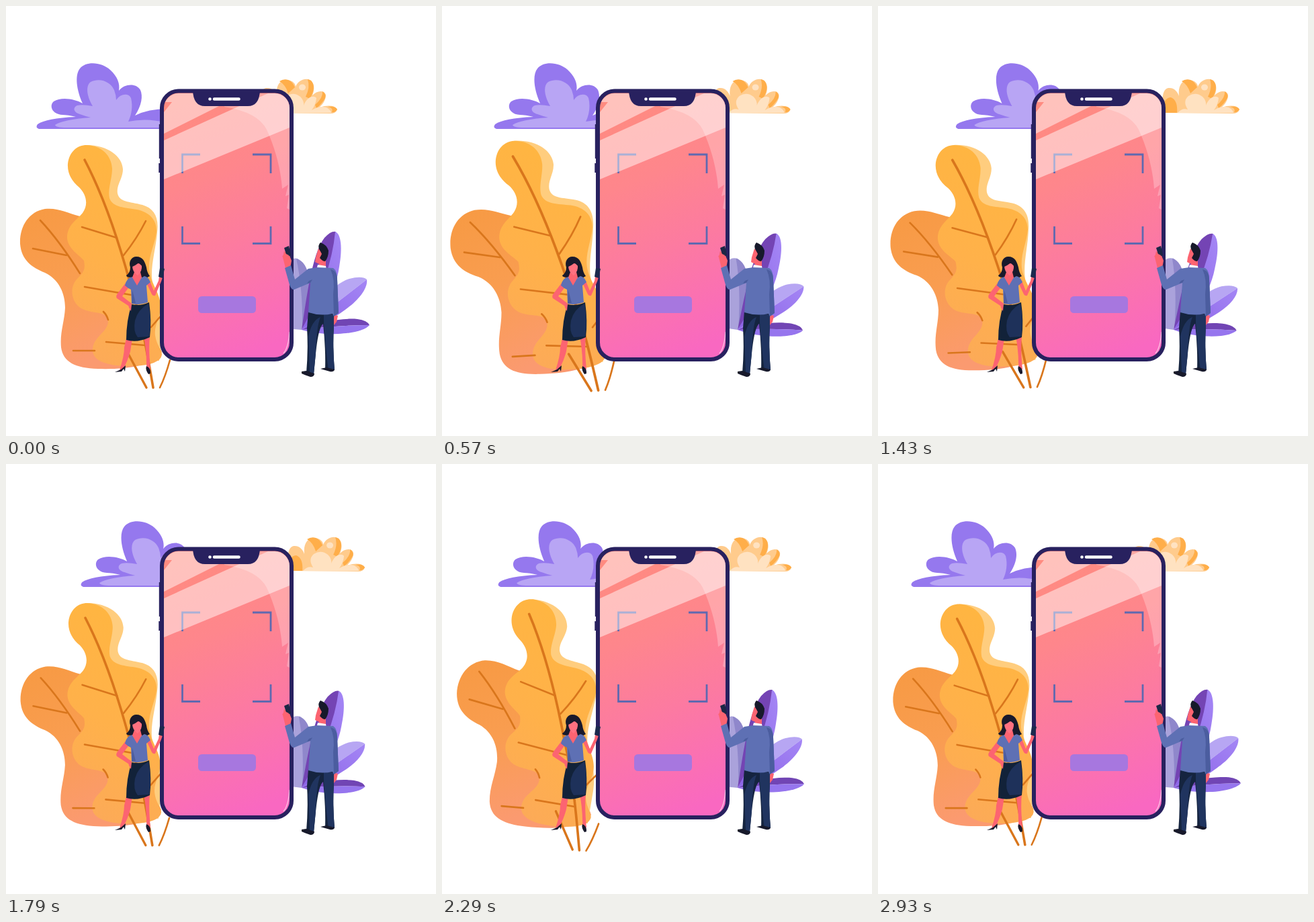
An HTML page that plays this animation: 640 px wide and 640 px high, repeating every 3000 ms.

```html
<!DOCTYPE html>
<html lang="en">
<head>
<meta charset="utf-8">
<title>Phone scan</title>
<style>
html, body { margin: 0; width: 100%; height: 100%; overflow: hidden; background: #fff; }
svg { display: block; width: 100%; height: 100%; }
.vein { fill: none; stroke: #d9761c; stroke-width: 2.6; stroke-linecap: round; }
</style>
</head>
<body>
<svg viewBox="0 0 640 640">
  <defs>
    <linearGradient id="screenFill" x1=".4" y1="0" x2=".6" y2="1">
      <stop offset="0" stop-color="#ff8b80"/><stop offset=".3" stop-color="#fe868c"/>
      <stop offset=".6" stop-color="#fc7aa1"/><stop offset="1" stop-color="#f968c1"/>
    </linearGradient>
    <linearGradient id="backLeaf" x1="0" y1="0" x2=".35" y2="1">
      <stop offset="0" stop-color="#f79a43"/><stop offset=".5" stop-color="#f99d50"/><stop offset="1" stop-color="#fb9a70"/>
    </linearGradient>
    <linearGradient id="tallLeaf" x1=".6" y1="0" x2=".35" y2="1">
      <stop offset="0" stop-color="#ffb640"/><stop offset=".55" stop-color="#ffb14a"/><stop offset="1" stop-color="#fcaa58"/>
    </linearGradient>
    <linearGradient id="petal" x1="0" y1="1" x2="1" y2="0">
      <stop offset="0" stop-color="#8b63e6"/><stop offset="1" stop-color="#a486f5"/>
    </linearGradient>
    <clipPath id="screenClip"><rect x="235" y="130" width="187" height="393" rx="22"/></clipPath>
  </defs>

  <g id="purpleCloud">
    <path fill="#9578ee" d="M49 183Q43 181 47 176Q60 167 104 165Q92 162 84 162C68 161 64 148 71 142C82 135 102 138 114 145C105 125 102 103 110 93C120 81 143 84 155 95C166 105 170 116 168 126C177 115 194 115 200 125C204 134 202 148 192 163Q212 153 240 153V183Z"/>
    <path fill="#b8a5f4" d="M73 177Q85 169 126 166Q118 164 110 161C100 158 99 151 106 148Q114 146 129 149C119 132 119 118 126 113C140 106 156 113 161 125Q164 133 164 140C170 130 183 129 186 137C189 149 187 162 182 172Q210 166 240 174V181H90Q74 181 73 177Z"/>
  </g>

  <g id="orangeCloud">
    <path fill="#ffcb8c" d="M380 159C377 138 378 124 387 122C396 121 401 128 403 134C401 117 409 109 419 110C427 111 431 116 431 120C435 110 447 106 454 111C460 117 459 126 456 133C463 125 475 125 476 133C476 140 471 147 466 151Q487 145 493 154Q491 160 483 160Z"/>
    <path fill="#ffae49" d="M380 159C378 143 384 136 391 136C399 139 401 149 400 159ZM407 112Q413 108 420 110Q427 113 430 121L420 130Q416 117 407 112ZM454 111C460 117 459 127 452 138L446 135Q453 121 449 109ZM471 127Q477 131 475 137Q470 146 462 152L460 147Q472 137 471 127ZM479 150Q490 148 493 154Q490 159 485 158Q488 152 479 150Z"/>
    <path fill="#ffe2c1" d="M401 159Q408 151 416 154Q408 142 417 134Q428 127 438 135Q444 141 443 148C448 135 458 132 462 137Q461 147 455 155Q467 148 477 151Q483 154 484 159Z"/>
    <ellipse cx="441" cy="121" rx="5" ry="4.500" fill="#ffe2c1"/>
  </g>

  <g id="tree">
    <path fill="url(#backLeaf)" d="M110 313C91 308 78 300 58 302C34 306 20 328 21 354C23 378 38 389 58 397C79 407 88 428 88 449C87 470 80 486 82 508C85 530 103 539 137 540C178 541 216 537 232 515L200 440Z"/>
    <path fill="#ffcd7e" d="M120 207C152 207 173 224 174 243C174 257 164 266 166 279C169 292 183 291 203 296C220 301 228 314 225 337C223 363 214 389 218 412C224 432 234 450 232 480L228 528L170 527Z"/>
    <path fill="url(#tallLeaf)" d="M120 207C143 208 157 223 158 242C158 258 151 272 154 286C159 300 177 300 195 303C214 307 225 319 224 336C222 354 212 371 213 391C215 413 229 426 230 445C231 463 220 474 222 490C224 505 232 511 232 519Q230 534 190 536C153 537 127 529 129 510C131 491 153 485 152 468C150 453 128 459 112 450C96 440 94 417 107 405C117 395 118 391 116 379C110 371 92 362 91 345C91 326 105 319 114 308C124 294 118 279 109 270C99 262 91 250 92 235C94 217 106 207 120 207Z"/>
    <path class="vein" d="M51 319Q80 350 110 398M40 361L90 371M100 513H132M145 455Q150 460 152 467"/>
    <path class="vein" style="stroke-width:3.6" d="M117 229C146 284 169 355 184 410C201 462 211 521 219 568"/>
    <path class="vein" d="M113 329L165 345M208 320Q195 346 175 371M117 418L192 431M149 500L207 505M235 456L216 478"/>
    <path class="vein" style="stroke-width:3.4" d="M180 514L209 568"/>
    <path class="vein" d="M244 527Q237 552 229 568"/>
  </g>

  <g id="plant">
    <path fill="#aaa2db" d="M418 480V382Q425 374 434 376Q445 383 448 412Q450 447 440 482Z"/>
    <path fill="#8f87cb" d="M432 376Q447 379 452 408Q455 448 441 480Q442 420 432 376Z"/>
    <g id="lowLeaves">
      <path fill="#b7a6f3" d="M440 482C458 446 487 414 511 406Q530 401 537 407Z"/>
      <path fill="url(#petal)" d="M440 482L537 407C539 420 525 438 505 452C481 470 459 479 440 482Z"/>
      <path fill="#7145b4" d="M440 482C464 470 502 464 523 466Q538 468 541 475Q496 475 440 482Z"/>
      <path fill="#9675ee" d="M440 482Q496 475 541 475C535 482 518 487 494 488Q463 489 440 482Z"/>
    </g>
    <path fill="#7444b4" d="M440 482C447 438 455 369 474 345Q484 334 491 336Q488 402 440 482Z"/>
    <path fill="url(#petal)" d="M440 482Q484 401 490 336C499 339 501 361 496 388C490 431 463 466 440 482Z"/>
  </g>

  <g id="phone">
    <path fill="#28215f" d="M227.800 176h4v51h-4zM227.300 234h4v14h-4z"/>
    <rect x="232" y="126.500" width="193" height="399.500" rx="25" fill="url(#screenFill)" stroke="#28215f" stroke-width="6"/>
    <g clip-path="url(#screenClip)">
      <path fill="none" stroke="#5f69b0" stroke-width="2.800" d="M262.500 249V221H289M367 221H394V249M394 328V353.500H367M289 353.500H262.500V328"/>
      <path fill="#fff" opacity=".25" d="M325 150Q375 158 388 184C402 215 409 244 411 272L420 266L416 283L421 281L418 301L424 304V130H325Z"/>
      <path fill="#fff" opacity=".47" d="M235 200L345 150L390 130H422V181L235 258ZM235 190V158L247 143H235V130H355L315 150Z"/>
      <path fill="none" stroke="#ffc6e4" stroke-width="1.200" d="M422 485Q420 510 413 517"/>
    </g>
    <path fill="#28215f" d="M278 126H378Q377 149 360 149H296Q279 149 278 126Z"/>
    <circle cx="303.500" cy="138.500" r="2.300" fill="#fff"/>
    <path stroke="#fff" stroke-width="4.500" stroke-linecap="round" d="M310 138.500H346.500"/>
    <rect x="286" y="432" width="86" height="25" rx="5.500" fill="#a777df"/>
  </g>

  <g id="woman">
    <path fill="#191a2c" d="M185 389C182 380 187 373 194 373C204 373 207 381 209 389Q210 397 214 402Q209 406 202 404H187Q179 404 179 401Q185 397 185 389Z"/>
    <path fill="#fc6471" d="M179 411L184 417L173 432L187 443L185 448L165 435Q163 432 166 428ZM209 412L214 409L220 424L227 409L228 403L233 404L231 410L222 431Q219 432 217 429Z"/>
    <path fill="#fc6471" d="M179 495H188L185 514Q181 529 174 541L169 542Q176 521 176 508ZM205 491H214Q212 512 215 541L209 542Q210 518 205 491Z"/>
    <path fill="#5e70b4" d="M177 416Q179 405 188 403L197 407L206 402Q212 403 215 411L209 416L211 441Q198 446 187 443L186 422L182 420Z"/>
    <path fill="#4c5d9f" d="M188 423L193 442L187 443Z"/>
    <path fill="#fc6471" d="M191 396H200L202 404L195 416L188 404Z"/>
    <path fill="#ff7180" d="M188 386Q195 379 202 386Q203 395 196 401Q188 396 188 386Z"/>
    <path fill="#191a2c" d="M186 389Q186 376 194 376Q204 376 204 389Q200 385 198 382Q193 386 186 389Z"/>
    <path fill="#122239" d="M187 444Q200 447 213 441Q217 469 214 493Q195 502 179 497Q179 468 187 444Z"/>
    <path fill="#1e315a" d="M212 443Q217 469 213 492L196 493Q189 485 192 468Q196 452 212 443Z"/>
    <path fill="#fc6471" d="M181 439L187 443L186 454L183 449Z"/>
    <path fill="#191a2c" d="M162 545L171 541L178 535L177 544L175 540L172 544ZM209 536Q216 539 215 547L212 548Q207 541 209 536Z"/>
    <path fill="#1b294d" d="M229 390L236 391L233 405L227 403Z"/>
  </g>

  <g id="man">
    <path fill="#fc6471" d="M416 390L412 374L414 365L421 369L425 379L423 390ZM487 459L494 461L492 470L488 475L484 469Z"/>
    <path fill="#1c2745" d="M414 360L421 357L424 371L418 373Z"/>
    <path fill="#fc6471" d="M411 373L415 368L421 371L419 378ZM465 361L461 374L460 381L466 384V390L476 389V373Z"/>
    <path fill="#17192b" d="M466 362Q464 356 468 352Q477 355 480 364Q480 374 475 380Q471 380 467 375L470 369Q468 365 466 362Z"/>
    <path fill="#fff" d="M464 385L476 387L477 393H462Z"/>
    <path fill="#15243f" d="M450 454L488 457L488 476Q486 507 489 542H475Q476 510 472 473Q465 478 461 517L458 548L447 546Q450 512 448 479Z"/>
    <path fill="#20345f" d="M473 459H488V476Q486 507 489 542H480Q476 514 473 473ZM450 492Q455 468 468 463Q462 478 461 517L458 548L452 546Z"/>
    <path fill="#5e70b4" d="M415 390L424 386L430 407L450 391L463 389L487 390Q493 394 493 407L495 457L488 462L486 458Q468 462 450 456L453 412L429 422Q425 423 422 415Z"/>
    <path fill="#4b5d9f" d="M483 392Q493 394 493 407L495 457L488 462L487 429Q490 407 483 392ZM453 412L448 413L451 409L456 407Z"/>
    <path fill="#17192b" d="M440 544L447 543L459 547Q459 552 453 552Q444 549 440 547ZM468 540L477 538L489 541Q488 545 482 544Z"/>
  </g>
</svg>
<script>
const LOOP = 3000, STEP = LOOP / 42;
const TIMES = [0, 570, 930, 1430, 1790, 2290, 2930];
const MOTION = {
  purpleX: [0, 32, 51, 70.5, 66, 38, 4],
  orangeX: [0, 25.5, 43, 45, 41, 27, 0],
  treeX: [0, -.5, .2, .7, 0, -2.2, .6],
  treeY: [0, 2.7, 4.5, 1.7, -.5, -3.2, 0],
  treeTurn: [0, -3.3, -5.5, -2.2, .35, 4.75, 0],
  treeScale: [1, 1.047, 1.045, 1.01, .997, 1.015, .992],
  plantTurn: [0, 3, 4.6, 3.2, 2, .4, .1],
  lowScale: [1, .96, .935, .925, .935, .98, .99]
};
const count = TIMES.length;
const timeAt = i => TIMES[(i + count) % count] + Math.floor(i / count) * LOOP;

// Cyclic cubic curve through unevenly spaced poses.
function sample(values, time) {
  const at = i => values[(i + count) % count];
  const slope = i => (at(i + 1) - at(i - 1)) / (timeAt(i + 1) - timeAt(i - 1));
  let i = count - 1;
  while (TIMES[i] > time) i--;
  const span = timeAt(i + 1) - timeAt(i), u = (time - timeAt(i)) / span, v = 1 - u;
  return v * v * ((1 + 2 * u) * at(i) + u * span * slope(i))
       + u * u * ((1 + 2 * v) * at(i + 1) - v * span * slope(i + 1));
}

const place = (id, transform) => document.getElementById(id).setAttribute('transform', transform);

function draw(now) {
  const time = Math.floor(((now + 3) % LOOP) / STEP) * STEP;
  const pose = {};
  for (const key in MOTION) pose[key] = sample(MOTION[key], time);
  place('purpleCloud', `translate(${pose.purpleX})`);
  place('orangeCloud', `translate(${pose.orangeX})`);
  place('tree', `translate(${122 + pose.treeX} ${407 + pose.treeY}) rotate(${pose.treeTurn}) scale(${pose.treeScale}) translate(-122 -407)`);
  place('plant', `rotate(${pose.plantTurn} 440 482)`);
  place('lowLeaves', `translate(440 482) rotate(${pose.plantTurn * .45}) scale(${pose.lowScale}) translate(-440 -482)`);
}

const start = performance.now();
function tick() {
  draw(performance.now() - start);
  requestAnimationFrame(tick);
}
tick();
</script>
</body>
</html>
```
